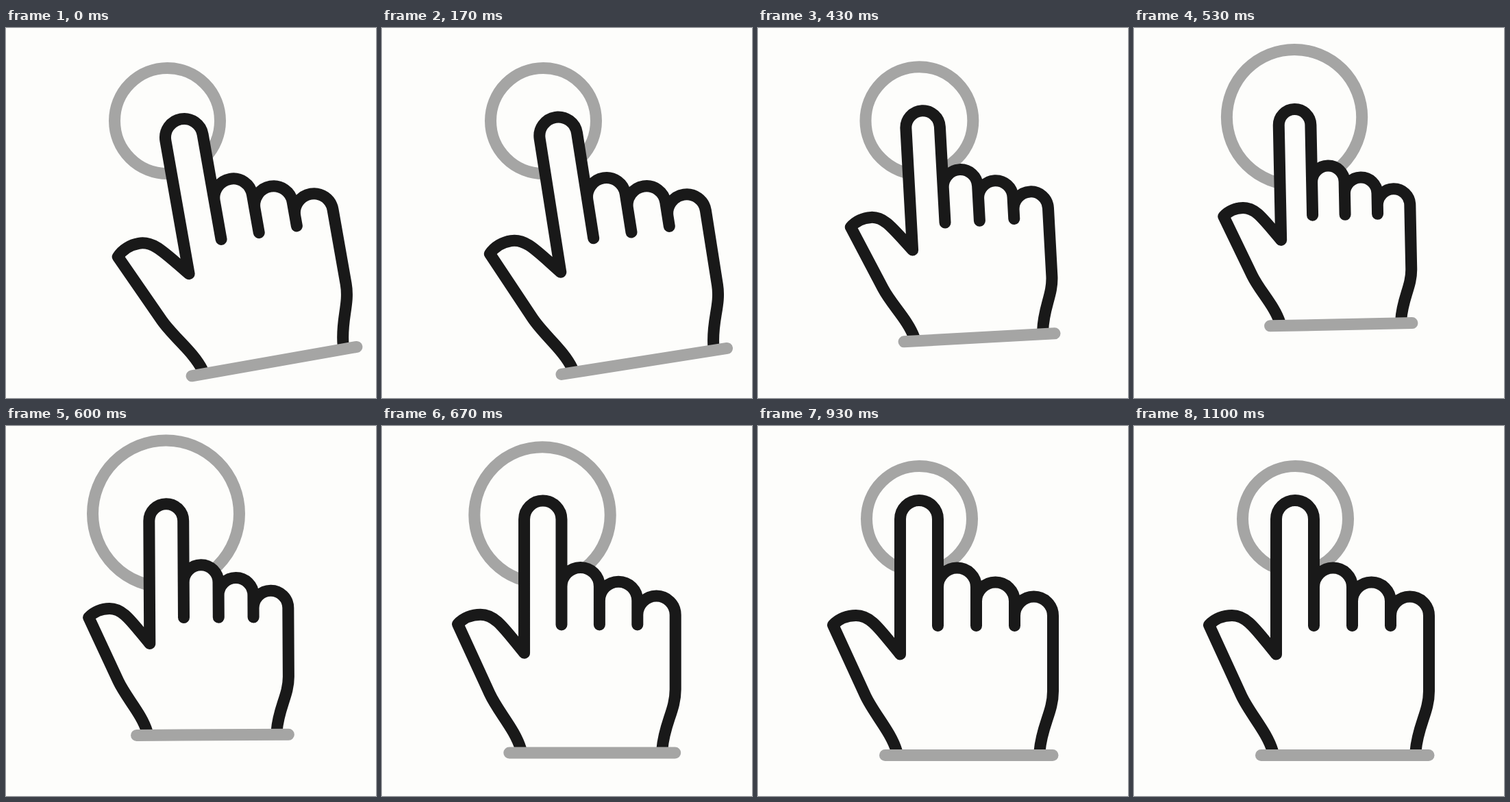
An HTML page for the animation above (1130 ms loop, 540 px wide and 540 px high).

```html
<!DOCTYPE html>
<html lang="en">
<head>
<meta charset="utf-8">
<title>Tap gesture</title>
<style>
  html, body { margin: 0; width: 100%; height: 100%; overflow: hidden; background: #fdfdfb; }
  svg { display: block; }
  path, circle { stroke-width: 17; stroke-linecap: round; stroke-linejoin: round; vector-effect: non-scaling-stroke; }
  .soft { fill: none; stroke: #a5a5a4; }
  .line { fill: #fdfdfb; stroke: #191919; }
</style>
</head>
<body>
<svg width="540" height="540">
  <circle id="ring" class="soft"/>
  <g id="hand">
    <path class="line" d="M202.5 475C194 446 169 420 156.5 393L109.5 290.5
      C118 281 131 276.5 143 276.5C165 276.5 177 296 207.5 333
      V136A27.5 27.5 0 0 1 262.5 136V235
      A28 28 0 0 1 318.5 235V256
      A28 28 0 0 1 374.5 256V277
      A28 28 0 0 1 430.5 277V387C430.5 418 414 437 411 475
      M262.5 235V291.5M318.5 256V291.5M374.5 277V291.5"/>
    <path class="soft" d="M185.5 480.5H430"/>
  </g>
</svg>
<script>
const LOOP = 1130, FRAMES = 34, FRAME_MS = 1000 / 30;
const ring = document.getElementById('ring');
const hand = document.getElementById('hand');

// Smooth 0..1 progress of t between a and b
function ease(t, a, b) {
  const u = Math.min(1, Math.max(0, (t - a) / (b - a)));
  return u * u * (3 - 2 * u);
}

function draw(t) {
  // Ring swells on the tap, then settles
  const swell = ease(t, 408, 600) - ease(t, 600, 800);
  ring.setAttribute('cx', 235.5 - 2 * swell);
  ring.setAttribute('cy', 135.5 - 7.5 * swell);
  ring.setAttribute('r', 77 + 30 * swell);

  // Hand swings upright, shrinks to press and springs back
  const tilt = 1 - ease(t, 40, 667);
  const scale = 1 - 0.154 * ease(t, 305, 520) + 0.174 * ease(t, 520, 720) - 0.02 * ease(t, 720, 900);
  const x = 235 + 25 * tilt, y = 136 + 24 * tilt;
  hand.setAttribute('transform',
    `translate(${x - 22} ${y + 20}) scale(${scale}) translate(22 -20) rotate(${-10 * tilt}) translate(-235 -136)`);
}

function tick() {
  const t = performance.now() % LOOP;
  draw(Math.floor((t + 3) * FRAMES / LOOP) % FRAMES * FRAME_MS);
  requestAnimationFrame(tick);
}
tick();
</script>
</body>
</html>
```
